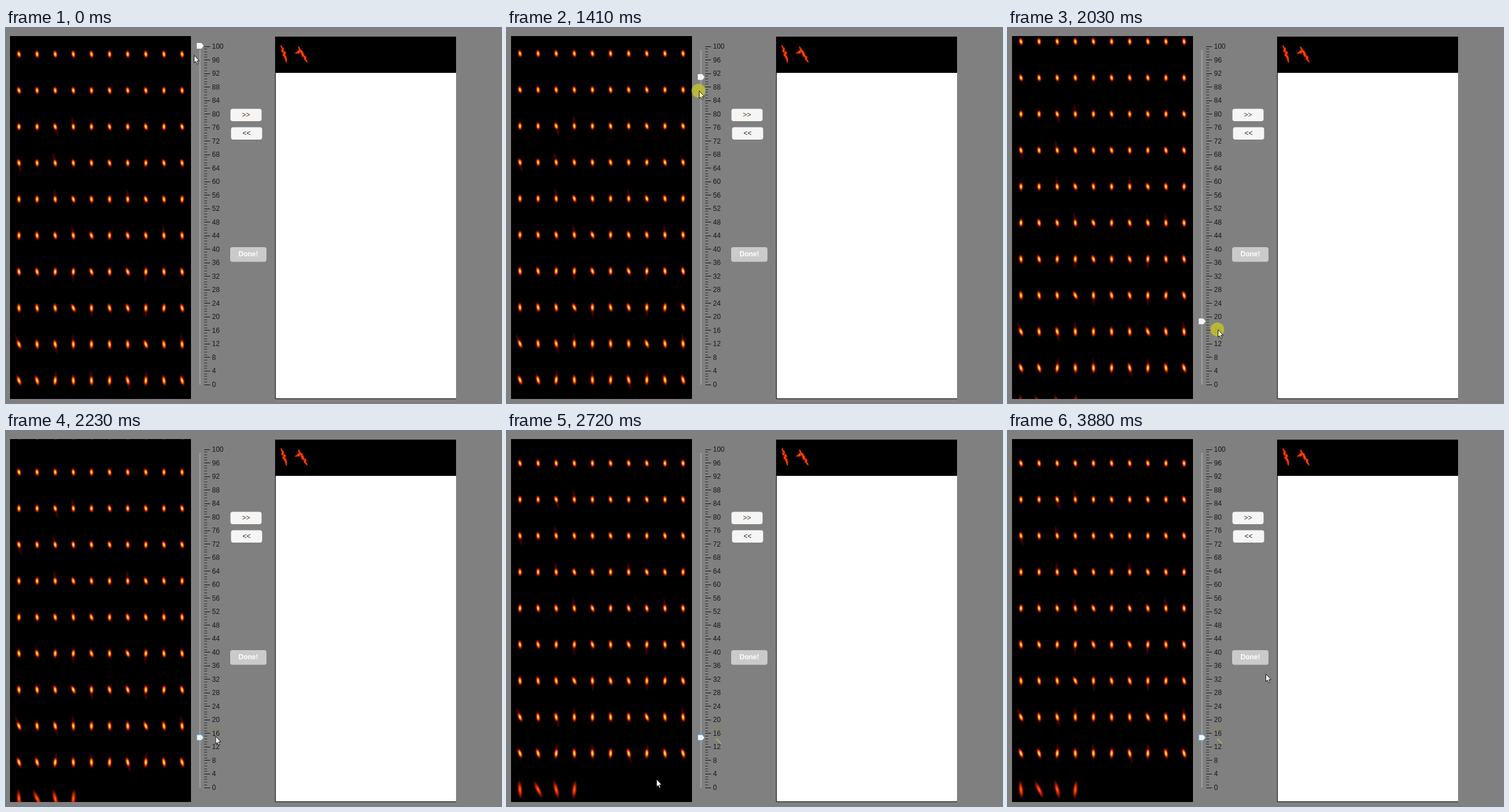
An HTML page with a canvas for the animation above (4340 ms loop, 859 by 652 pixels).

```html
<!DOCTYPE html>
<html lang="en">
<head>
<meta charset="utf-8">
<title>Spot selection</title>
<style>
html, body { margin: 0; width: 100%; height: 100%; overflow: hidden; background: #808080; }
canvas { display: block; }
</style>
</head>
<body>
<canvas id="stage" width="859" height="652"></canvas>
<script>
const ctx = document.getElementById('stage').getContext('2d');
const FONT = '"Liberation Sans", Arial, sans-serif';
const LOOP = 4340;
const STEP = 70;
const PRESS = 1060, RELEASE = 2230;
const SPOTS = 104, COLUMNS = 10;

// Bursts of screen updates: start time and number of steps
const BURSTS = [[380, 5], [PRESS, 8], [1610, 8], [2160, 8], [2720, 6], [3740, 3]];

// Key points: time, values, and the power that eases the way there
const CURSOR = [
  { t: 310, at: [326, 47] },
  { t: 660, at: [332, 31] },
  { t: PRESS, at: [332, 31] },
  { t: 1680, at: [335, 237], power: 1.7 },
  { t: 2030, at: [364, 524] },
  { t: 2370, at: [363, 535] },
  { t: 2720, at: [259, 605], power: 2 },
  { t: 3060, at: [137, 640] },
  { t: 3670, at: [137, 640] },
  { t: 3880, at: [447, 422], power: .7 }
];
const THUMB = [
  { t: PRESS, at: [31] },
  { t: 1680, at: [222], power: 2.2 },
  { t: 2030, at: [510] },
  { t: RELEASE, at: [533] }
];
const SCROLL = [
  { t: 1380, at: [0] },
  { t: 1680, at: [11] },
  { t: 2030, at: [22] },
  { t: 2370, at: [47.5] },
  { t: 2720, at: [52.5], power: .7 }
];

function radial(...stops) {
  const gradient = ctx.createRadialGradient(0, 0, 0, 0, 0, 1);
  for (const [at, color] of stops) gradient.addColorStop(at, color);
  return gradient;
}
const HOT = radial([0, '#ffffb0'], [.2, '#ffe030'], [.38, '#ff8000'],
  [.56, '#c81800'], [.78, '#480000'], [1, '#000']);
const FLAME = radial([0, '#ff8a10'], [.3, '#f03800'], [.6, '#901000'], [1, '#000']);
const EMBER = radial([0, '#500600'], [1, '#000']);

function heldTime(t) {
  let held = 0;
  for (const [start, steps] of BURSTS) {
    if (t >= start) held = start + STEP * Math.min(steps - 1, Math.floor((t - start) / STEP));
  }
  return held;
}

function valuesAt(keys, t) {
  const next = keys.findIndex(key => key.t > t);
  if (next === 0) return keys[0].at;
  if (next < 0) return keys[keys.length - 1].at;
  const a = keys[next - 1], b = keys[next];
  const k = ((t - a.t) / (b.t - a.t)) ** (b.power || 1);
  return a.at.map((v, i) => v + (b.at[i] - v) * k);
}

// Repeatable random number in 0..1
function random(index, salt) {
  const v = Math.sin(index * 12.9898 + salt * 78.233) * 43758.5453;
  return v - Math.floor(v);
}

function rect(x, y, w, h, color) {
  ctx.fillStyle = color;
  ctx.fillRect(x, y, w, h);
}

function text(str, x, y, color, align, weight = '') {
  ctx.font = `${weight} 12px ${FONT}`;
  ctx.textAlign = align;
  ctx.fillStyle = color;
  ctx.fillText(str, x, y);
}

function button(label, x, y, w, h, fill, color, weight) {
  ctx.fillStyle = fill;
  ctx.beginPath();
  ctx.roundRect(x, y, w, h, 4);
  ctx.fill();
  text(label, x + w / 2, y + h / 2 + 3.5, color, 'center', weight);
}

function polygon(x, y, points, fill, stroke) {
  ctx.beginPath();
  for (const [dx, dy] of points) ctx.lineTo(x + dx, y + dy);
  ctx.closePath();
  ctx.fillStyle = fill;
  ctx.fill();
  if (stroke) {
    ctx.strokeStyle = stroke;
    ctx.lineWidth = 1;
    ctx.stroke();
  }
}

function glow(x, y, rx, ry, degrees, paint) {
  ctx.save();
  ctx.translate(x, y);
  ctx.rotate(degrees * Math.PI / 180);
  ctx.scale(rx, ry);
  ctx.fillStyle = paint;
  ctx.beginPath();
  ctx.arc(0, 0, 1, 0, 7);
  ctx.fill();
  ctx.restore();
}

function blackPanel(x, y, w, h, content) {
  ctx.save();
  ctx.beginPath();
  ctx.rect(x, y, w, h);
  ctx.clip();
  rect(x, y, w, h, '#000');
  ctx.globalCompositeOperation = 'lighten';
  content();
  ctx.restore();
}

// Spots get longer, more tilted and more often tailed towards the bottom
function drawSpots(scroll) {
  for (let i = 0; i < SPOTS; i++) {
    const row = Math.floor(i / COLUMNS);
    const x = 22.5 + 31.45 * (i % COLUMNS);
    const y = 45.5 + 63.05 * row - scroll;
    const lean = -9 + (random(i, 1) - .5) * (12 + row * 2.5);
    const last = row === 10;
    if (random(i, 2) < row / 16) {
      const end = random(i, 3) < .7 ? -9 : 9;
      glow(x - Math.sin(lean * Math.PI / 180) * end, y + end, 3.5, 11, lean, EMBER);
    }
    glow(x, y, 4.7, last ? 17 : 8.4 + row * row * .035, lean, last ? FLAME : HOT);
  }
}

function streak(x0, y0, x1, y1) {
  const angle = Math.atan2(x0 - x1, y1 - y0) * 180 / Math.PI;
  const count = Math.ceil(Math.hypot(x1 - x0, y1 - y0) / 4);
  for (let i = 0; i <= count; i++) {
    const k = i / count;
    const x = x0 + (x1 - x0) * k + (random(i, x0) - .5) * 2.5;
    glow(x, y0 + (y1 - y0) * k, 2 + 2 * Math.sin(k * Math.PI), 5, angle, FLAME);
  }
}

function drawSelection() {
  streak(479, 33, 486, 57);
  streak(509, 35, 521, 57);
  streak(504, 43, 512, 40);
}

function drawScale() {
  rect(335, 38, 3, 582, '#989898');
  for (let i = 0; i <= 125; i++) {
    const major = i % 5 === 0;
    rect(344, Math.round(619.5 - i * 4.704), major ? 10 : 5, 1, major ? '#111' : '#2c2c2c');
  }
  for (let value = 0; value <= 100; value += 4) {
    text(value, 357.5, 624 - value * 5.88, '#161616', 'left');
  }
}

// Faint marks left on screen where the slider was let go
function drawTraces() {
  ctx.lineWidth = 1.5;
  ctx.strokeStyle = '#858550';
  ctx.beginPath();
  ctx.arc(364, 527, 11, -2.9, -.2);
  ctx.stroke();
  ctx.strokeStyle = '#c4bd42';
  ctx.beginPath();
  ctx.moveTo(363, 535);
  ctx.lineTo(371.5, 543.5);
  ctx.stroke();
}

function drawCursor(x, y, pressed) {
  if (pressed) {
    ctx.fillStyle = 'rgba(194, 192, 48, .85)';
    ctx.beginPath();
    ctx.arc(x - .8, y, 12, 0, 7);
    ctx.fill();
  }
  polygon(x + .5, y + .5, [[0, 0], [0, 13], [2.8, 10.5], [5, 15.3], [7, 14.3], [5, 9.7], [9, 9.7]],
    pressed ? '#fffcb0' : '#fff', '#111');
}

function draw(t) {
  const [scroll] = valuesAt(SCROLL, t);
  const [thumb] = valuesAt(THUMB, t);
  const [x, y] = valuesAt(CURSOR, t);
  const released = t >= RELEASE;

  rect(0, 0, 859, 652, '#808080');
  blackPanel(7, 14, 314, 631, () => drawSpots(scroll));
  rect(467, 15, 314, 630, '#000');
  rect(468, 78, 313, 566, '#fff');
  blackPanel(467, 15, 314, 62.5, drawSelection);

  drawScale();
  if (released) drawTraces();
  polygon(331, thumb, [[0, -5], [8, -5], [12, 0], [8, 5], [0, 5]], '#f6f6f6', released && '#4a9cc8');

  button('>>', 389.5, 140.5, 54, 21.5, '#f5f5f5', '#5c3018');
  button('<<', 390.5, 172.5, 54, 21.5, '#f5f5f5', '#222');
  button('Done!', 389, 381, 63, 25.5, '#cacaca', '#fff', 'bold');

  drawCursor(x, y, t >= PRESS && !released);
}

function tick() {
  draw(heldTime(performance.now() % LOOP));
  requestAnimationFrame(tick);
}
tick();
</script>
</body>
</html>
```
